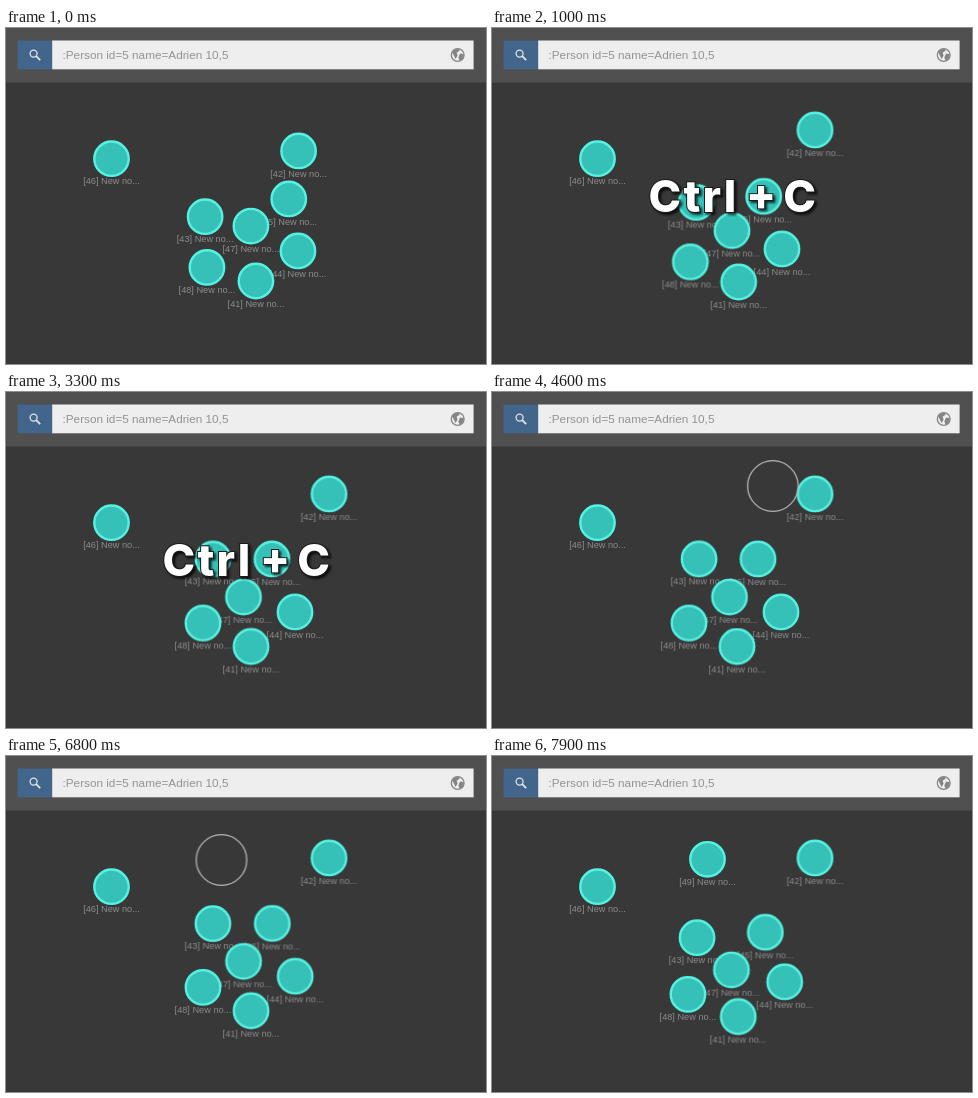
Recreate the animation shown at these times as an HTML page. Size 480 px wide and 336 px high, loop 8 s.

```html
<!DOCTYPE html>
<html lang="en">
<head>
<meta charset="utf-8">
<title>Graph copy and paste</title>
<style>
  html, body { margin: 0; width: 100%; height: 100%; overflow: hidden; background: #383838; }
  svg { display: block; font-family: "Liberation Sans", Arial, sans-serif; }

  .node circle { fill: #35c0b8; stroke: #56f2e1; stroke-width: 2.4; }
  .node text { font-size: 9.2px; fill: #8c8c8c; text-anchor: middle; }
  .free { animation: settle 8s infinite; }
  .dragged { animation: drag 8s infinite; }
  .pinned { transform: translate(var(--start)); }
  .pasted { transform: translate(var(--start)); animation: paste 8s step-end infinite; }

  .ring {
    fill: none; stroke: #b4b4b4; stroke-width: 1.3;
    animation: carry 8s infinite, ring 8s step-end infinite;
  }

  .caption {
    font: 800 44px Inter, "Open Sans", sans-serif;
    fill: #fff; stroke: #1c1c1c; stroke-width: 2px; paint-order: stroke;
    filter: drop-shadow(2.5px 2.5px 1px rgba(0, 0, 0, .75));
    animation: caption 8s linear infinite;
  }

  @keyframes settle {
    0% { transform: translate(var(--start)); animation-timing-function: cubic-bezier(.215, .61, .355, 1); }
    43%, 83.75% { transform: translate(var(--rest)); animation-timing-function: cubic-bezier(.35, .1, .4, 1); }
    98.75%, 100% { transform: translate(var(--pushed)); }
  }
  @keyframes drag {
    0% { transform: translate(var(--start)); animation-timing-function: ease-out; }
    10%, 100% { transform: translate(var(--rest)); }
  }
  @keyframes carry {
    0%, 53% { transform: translate(301px, 96px); animation-timing-function: ease-in; }
    57.5% { transform: translate(281px, 94px); animation-timing-function: ease-out; }
    66.25%, 70% { transform: translate(226px, 101px); animation-timing-function: ease-in-out; }
    81.25%, 100% { transform: translate(215.5px, 104px); }
  }
  @keyframes ring {
    0% { opacity: 0; }
    53% { opacity: 1; }
    86.25%, 100% { opacity: 0; }
  }
  @keyframes paste {
    0% { opacity: 0; }
    86.25%, 100% { opacity: 1; }
  }
  @keyframes caption {
    0%, 6.5% { opacity: 0; }
    10.5%, 46.8% { opacity: 1; }
    51.5%, 100% { opacity: 0; }
  }
</style>
</head>
<body>
<svg width="480" height="336" viewBox="0 0 480 336">
  <rect width="480" height="336" fill="#383838"/>
  <rect width="480" height="54.5" fill="#505050"/>
  <rect x="46" y="12.5" width="421.6" height="28.8" fill="#eee"/>
  <rect x="11.6" y="12.5" width="34.6" height="28.8" fill="#42658b"/>

  <g fill="none" stroke="#e4e4e4" stroke-width="1.3">
    <circle cx="27.6" cy="25.6" r="3.5"/>
    <path d="M30.2 28.2L34.2 32.2" stroke-width="1.8"/>
  </g>

  <text x="56.5" y="31" font-size="11.75" fill="#929292">:Person id=5 name=Adrien 10,5</text>

  <circle cx="451.7" cy="27" r="6.4" fill="#eee" stroke="#858585" stroke-width="1.3"/>
  <path fill="#858585" d="M446 24q3-3.6 7-3.2l.6 2-3 2 1 2.6-2 3.6zM454 25.6l4 .6-1.6 5-3 1.4-1-3z"/>

  <g id="nodes"></g>
  <circle class="ring" r="25.3"/>

  <g class="caption">
    <text x="156.5" y="184" letter-spacing="2.2">Ctrl</text>
    <text x="269" y="181.5" text-anchor="middle">+</text>
    <text x="307.7" y="184" text-anchor="middle">C</text>
  </g>
</svg>
<script>
  const pasted = { id: 49, kind: "pasted", start: [215.5, 103.3] };

  // In stacking order.
  const nodes = [
    { id: 46, kind: "pinned", start: [105.5, 130.7] },
    { id: 42, kind: "dragged", start: [291.5, 123.7], rest: [323, 102] },
    { id: 43, kind: "free", start: [199, 189], rest: [207, 167] },
    { id: 44, kind: "free", start: [292, 223], rest: [289, 220] },
    { id: 45, kind: "free", start: [283, 171], rest: [266, 167] },
    { id: 47, kind: "free", start: [245, 198], rest: [237.5, 205] },
    { id: 48, kind: "free", start: [201, 239.5], rest: [197, 231] },
    { id: 41, kind: "free", start: [250, 253], rest: [245, 254.5] },
    pasted
  ];

  // The pasted node repels others by an amount inverse to their distance.
  const repel = ([x, y]) => {
    const dx = x - pasted.start[0], dy = y - pasted.start[1];
    const k = 950 / (dx * dx + dy * dy);
    return [x + dx * k, y + dy * k];
  };

  const px = point => point.map(v => `${v.toFixed(1)}px`).join();

  const markup = ({ id, kind, start, rest = start }) =>
    `<g class="node ${kind}" style="--start:${px(start)};--rest:${px(rest)};--pushed:${px(repel(rest))}">
      <circle r="17.2"/><text y="25.7">[${id}] New no...</text></g>`;

  document.getElementById("nodes").innerHTML = nodes.map(markup).join("");
</script>
</body>
</html>
```
